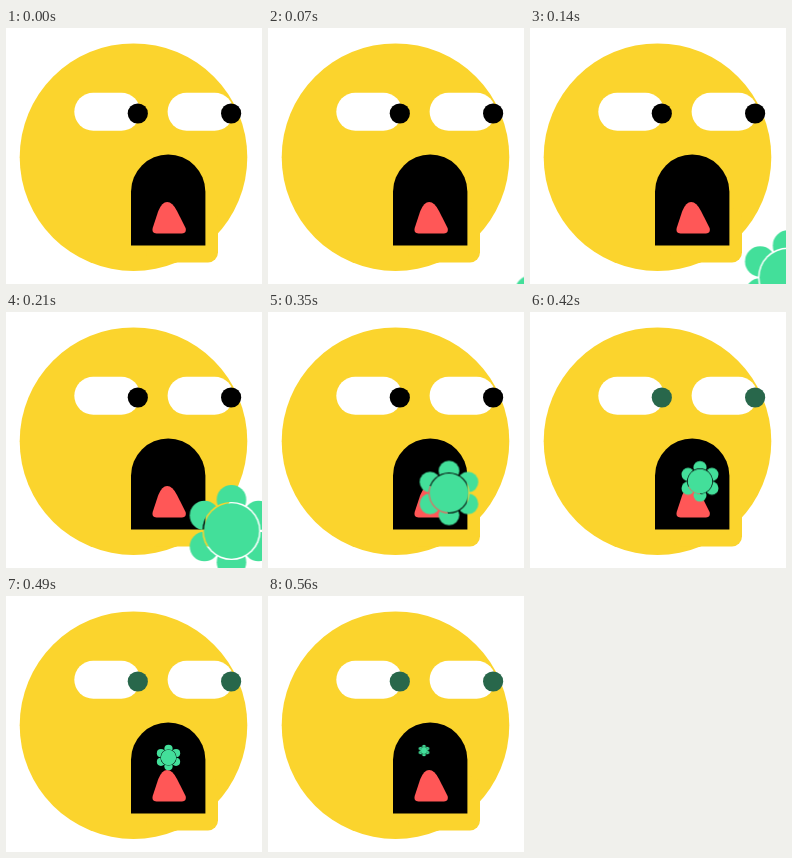
Animation of 256x256 px, one loop 0.63 s. Source, as an HTML page:

```html
<!DOCTYPE html>
<html lang="en">
<head>
<meta charset="utf-8">
<title>Surprised face</title>
<style>
  html, body { margin: 0; width: 100%; height: 100%; overflow: hidden; background: #fff; }
  svg { display: block; width: 100vw; height: 100vh; }
  .skin { fill: #fbd42d; }
  .eye { fill: #fff; }
  .pupil { fill: #000; }
  .mouth { fill: #000; }
  .tongue { fill: #ff5757; }
  #flower { fill: #43df9a; }
</style>
</head>
<body>
<svg viewBox="0 0 256 256">
  <mask id="gap" maskUnits="userSpaceOnUse" x="-50" y="-50" width="100" height="100">
    <rect x="-50" y="-50" width="100" height="100" fill="#fff"/>
    <circle r="28" fill="#000"/>
  </mask>

  <circle class="skin" cx="127.5" cy="129.2" r="113.8"/>
  <rect class="skin" x="140" y="180" width="72" height="54.5" rx="10"/>

  <rect class="eye" x="68.3" y="64.8" width="66" height="38" rx="19"/>
  <rect class="eye" x="161.6" y="64.8" width="66" height="38" rx="19"/>
  <circle class="pupil" cx="131.8" cy="85.5" r="10.1"/>
  <circle class="pupil" cx="225.1" cy="85.5" r="10.1"/>

  <path class="mouth" d="M125 217.5V163.7a37.2 37.2 0 0 1 74.4 0V217.5Z"/>
  <path class="tongue" d="M150.5 205.5Q145.3 205.3 146.7 200L152.3 183Q156 174 161.2 174T171 183L179.6 200Q181 205.3 176 205.5Z"/>

  <g id="flower">
    <g id="petals" mask="url(#gap)"></g>
    <circle r="26.6"/>
  </g>
</svg>
<script>
  const STEP = 70;
  // Flower centre and scale, one row per step
  const path = [
    [320, 320, 1.07],
    [290, 279, 1.07],
    [258, 249.5, 1.07],
    [225.5, 219, 1.04],
    [191.7, 193.5, 1],
    [181, 181, 0.73],
    [170, 169.3, 0.46],
    [162.5, 161.5, 0.29],
    [156, 154.5, 0.13]
  ];
  const GLOW_STEP = 6;

  const petals = document.getElementById('petals');
  for (let i = 0; i < 6; i++) {
    const petal = document.createElementNS('http://www.w3.org/2000/svg', 'circle');
    const angle = Math.PI * (i / 3 + 0.5);
    petal.setAttribute('cx', 30 * Math.cos(angle));
    petal.setAttribute('cy', 30 * Math.sin(angle));
    petal.setAttribute('r', 14.2);
    petals.append(petal);
  }

  // Hold each row's style for one step, then jump to the next
  function playSteps(element, styles) {
    const frames = styles.map((style, i) => ({
      ...style, offset: i / styles.length, easing: 'step-end'
    }));
    frames.push({ ...styles[styles.length - 1], offset: 1 });
    const animation = element.animate(frames, {
      duration: STEP * styles.length, iterations: Infinity
    });
    animation.startTime = 0;
  }

  playSteps(document.getElementById('flower'), path.map(([x, y, s]) => ({
    transform: `translate(${x}px, ${y}px) scale(${s})`
  })));

  for (const pupil of document.querySelectorAll('.pupil')) {
    playSteps(pupil, path.map((_, i) => ({ fill: i < GLOW_STEP ? '#000000' : '#28674b' })));
  }
</script>
</body>
</html>
```
